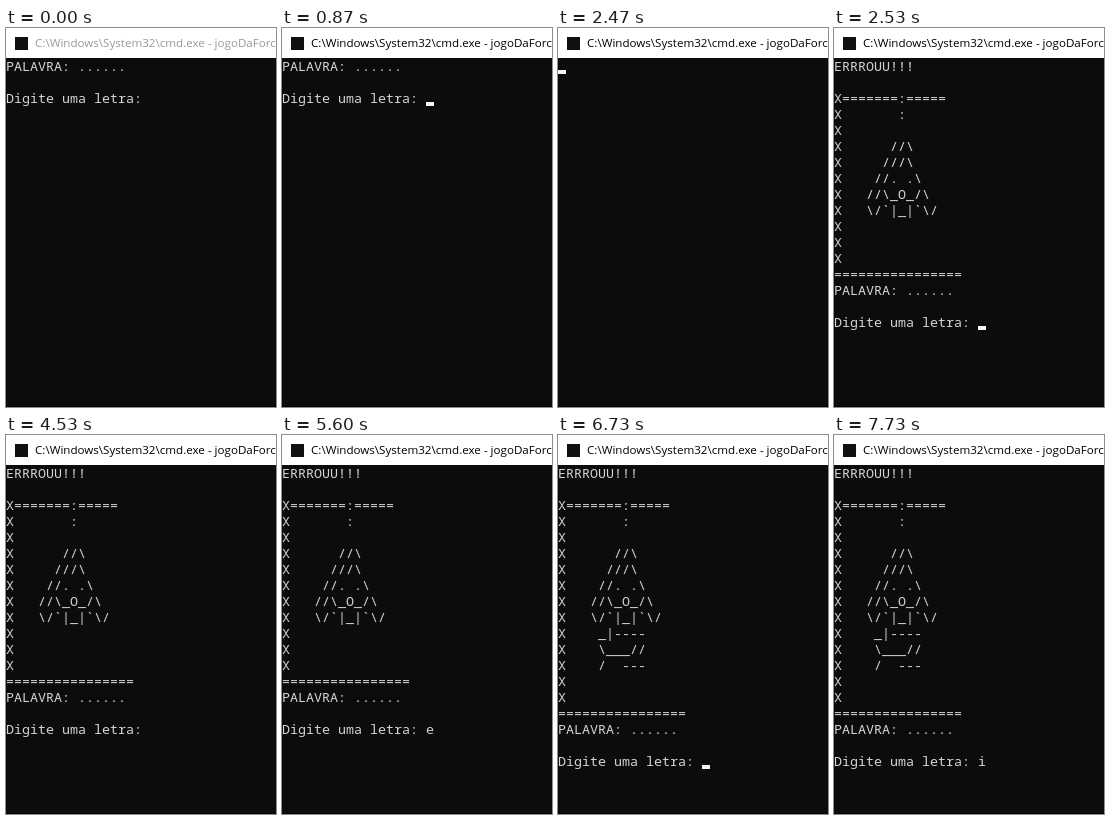
Write an HTML page that moves like this. It is 270x379 px and loops after 8 s.

```html
<!DOCTYPE html>
<html lang="pt">
<head>
<meta charset="utf-8">
<style>
html, body { margin: 0; width: 100%; height: 100%; overflow: hidden; background: #0c0c0c; }
svg { display: block; width: 270px; height: 379px; }
text { white-space: pre; }
#title { font: 11.6px "Open Sans", sans-serif; }
#rows { font: 500 13.3333px "Noto Sans Mono", monospace; fill: #d4d4d4; font-variant-ligatures: none; }
</style>
</head>
<body>
<svg viewBox="0 0 270 379">
  <rect width="270" height="379" fill="#0c0c0c"/>
  <rect y="378" width="270" height="1" fill="#000"/>
  <rect width="270" height="30" fill="#fff"/>
  <rect x="9" y="9" width="13" height="13" fill="#101010"/>
  <text id="title" x="29" y="19">C:\Windows\System32\cmd.exe - jogoDaForc</text>
  <g id="rows"></g>
  <rect id="cursor" width="8" height="4" fill="#f3f3f3"/>
</svg>
<script>
const LOOP = 8000, CELL_W = 8, CELL_H = 16, TOP = 30;
const $ = id => document.getElementById(id);
const title = $('title'), rows = $('rows'), cursor = $('cursor');

const prompt = ['PALAVRA: ......', '', 'Digite uma letra: '];
const head = [
  '      //\\',
  '     ///\\',
  '    //. .\\',
  '   //\\_O_/\\',
  '   \\/`|_|`\\/'
];
const body = ['    _|----', '    \\___//', '    /  ---'];
const gallows = parts => [
  'ERRROUU!!!', '',
  'X=======:=====',
  ...['       :', '', ...parts].map(s => 'X' + s),
  '='.repeat(16),
  ...prompt
];

const start = prompt;
const miss1 = gallows([...head, '', '', '']);
const miss2 = gallows([...head, ...body, '', '']);

// [time, screen, typed letter, cursor column, cursor row]; no column = cursor hidden
const steps = [
  [0, start, ''],
  [870, start, '', 18, 2],
  [1400, start, ''],
  [1730, start, 'a', 19, 2],
  [1930, start, 'a'],
  [2270, start, 'a', 0, 3],
  [2470, [], '', 0, 0],
  [2530, miss1, '', 18, 16],
  [3530, miss1, ''],
  [4000, miss1, '', 18, 16],
  [4530, miss1, ''],
  [5130, miss1, '', 18, 16],
  [5270, miss1, 'e', 19, 16],
  [5600, miss1, 'e'],
  [6130, miss1, 'e', 19, 16],
  [6530, miss1, 'e', 0, 17],
  [6600, [], '', 0, 0],
  [6730, miss2, '', 18, 18],
  [7200, miss2, ''],
  [7330, miss2, 'i', 19, 18],
  [7730, miss2, 'i']
];

const lines = miss2.map((_, i) => {
  const line = document.createElementNS('http://www.w3.org/2000/svg', 'text');
  line.setAttribute('x', 0);
  line.setAttribute('y', TOP + CELL_H * i + 13);
  return rows.appendChild(line);
});

let shown = null;

function draw(t) {
  title.setAttribute('fill', t < 330 ? '#999' : '#000');
  const step = steps.findLast(s => s[0] <= t);
  if (step === shown) return;
  shown = step;
  const [, screen, letter, col, row] = step;
  lines.forEach((line, i) => {
    const tail = i === screen.length - 1 ? letter : '';
    line.textContent = (screen[i] || '') + tail;
  });
  const on = col !== undefined;
  cursor.setAttribute('visibility', on ? 'visible' : 'hidden');
  if (on) {
    cursor.setAttribute('x', col * CELL_W);
    cursor.setAttribute('y', TOP + row * CELL_H + 12);
  }
}

const began = performance.now();
function tick() {
  draw((performance.now() - began) % LOOP);
  requestAnimationFrame(tick);
}
draw(0);
requestAnimationFrame(tick);
</script>
</body>
</html>
```
